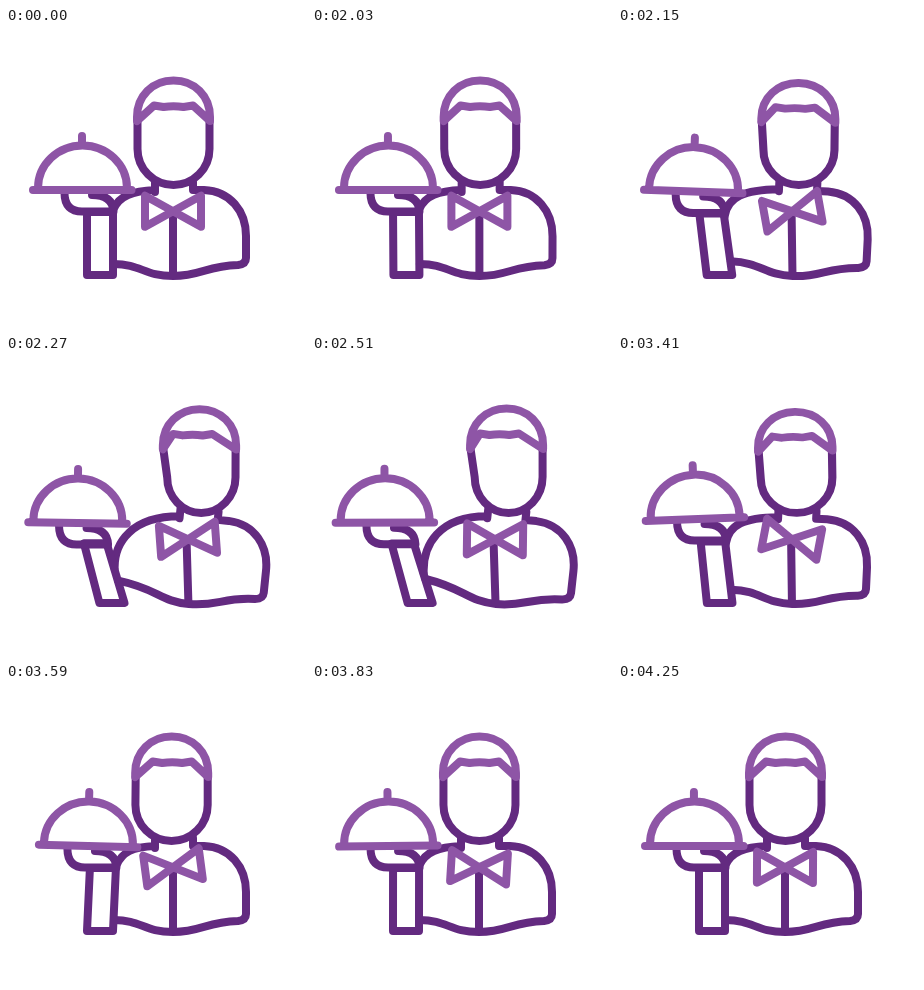
These frames come from a looping animation (300x300 px, 4280 ms). An HTML page:

```html
<!DOCTYPE html>
<html lang="en">
<head>
<meta charset="utf-8">
<style>
  html, body { margin: 0; width: 100%; height: 100%; overflow: hidden; background: #fff; }
  svg { display: block; width: 100vw; height: 100vh; }
  path { fill: none; stroke-width: 8; stroke-linecap: round; stroke-linejoin: round; }
  .dark { stroke: #632a80; }
  .light { stroke: #8e55a6; }
</style>
</head>
<body>
<svg viewBox="0 0 300 300">
  <path id="body" class="dark"/>
  <path id="seam" class="dark"/>
  <g id="head">
    <path id="face" class="dark"/>
    <path id="hair" class="light"/>
  </g>
  <path id="bow" class="light" d="M-28 -15.5V15.5L28 -15.5V15.5Z"/>
  <path id="sleeve" class="dark"/>
  <path id="hand" class="dark" d="M58.5 165C58.5 178 65 183.5 76 183.5H107.5C107 172 99 167 86 167"/>
  <path id="dish" class="light" d="M27 162H125.5M32 160a44.5 42.5 0 0 1 89 0M76 108V116"/>
</svg>
<script>
const LOOP = 4280, STEP = 30, FIRST_STEP = 2030;
const TURN = 2000, RETURN = 3200;

const $ = id => document.getElementById(id);
const shape = (id, d) => $(id).setAttribute('d', d);
const place = (id, transform) => $(id).setAttribute('transform', transform);

function ease(u) {
  u = Math.min(1, Math.max(0, u));
  return u * u * (3 - 2 * u);
}
const bell = (t, center, width) => Math.exp(-(((t - center) / width) ** 2));
const wobble = t => t < 80 ? 0 : 13 * bell(t, 0, 550) * Math.sin((t - 80) / 440 * 2 * Math.PI);

function draw(time) {
  const t = FIRST_STEP + Math.floor((time - FIRST_STEP) / STEP) * STEP;
  const there = t - TURN, back = t - RETURN;

  // The way back mirrors the way out.
  const turn = ease(there / 320) - ease(back / 380);
  const swing = wobble(back) - wobble(there);
  const sway = bell(back, 370, 130) - bell(there, 370, 130);
  const lean = bell(back, 190, 60) - bell(there, 190, 60);
  const headTurn = turn - 0.07 * sway;

  // Dish, hand and sleeve
  const slide = 6 * sway - 1.5 * turn;
  const sink = turn * (3 - 0.5 * slide);
  const handX = slide * (0.5 + 0.7 * turn);
  const top = 184 + 3.5 * turn;
  const topL = 81 + 2.5 * turn + handX, topR = 107 - turn + handX;
  const lowL = 81 + (18 + slide) * turn, lowR = 107 + (17 + slide) * turn;
  place('dish', `translate(${slide} ${sink}) rotate(${-0.2 * swing} 76 162)`);
  place('hand', `translate(${handX} ${sink})`);
  shape('sleeve', `M${topL} ${top}H${topR}L${lowR} 247H${lowL}Z`);

  // Body shears towards the turn; its left ends rest on the sleeve.
  const bend = d => d.replace(/([\d.]+) ([\d.]+)/g, (_, x, y) =>
    `${+x + turn * (17 + (248 - y) * 0.11)} ${+y + turn * (x - 167) * 0.1}`);
  const edge = y => topR + (lowR - topR) * (y - top) / (247 - top) + 0.5;
  const shoulder = 181 + 36 * turn * turn, hem = 236 - 13 * turn * turn;
  shape('body',
    `M${edge(shoulder)} ${shoulder}` +
    `C${edge(shoulder) + 6 - 7 * turn} ${shoulder - 13 - 14 * turn} 126 ${163 - 3 * turn} ` +
    bend('149 162M149 154L149 164M187 154L187 162L198 162' +
      'C224 163 240 183 240 208L240 230Q240 236 232 237' +
      'C200 238 195 248 167 248C138 248 135 236 ') +
    `${edge(hem)} ${hem}`);
  shape('seam', `M${167 + 14.5 * turn} 184L${167 + 16.5 * turn} 247`);
  place('bow', `translate(${167 + 16 * turn} 183.3) rotate(${swing})`);

  // Head: the chin stays level while the crown dips.
  const dip = Math.abs(lean);
  place('head', `translate(${167.5 + 26.5 * headTurn} 157) rotate(${-lean}) ` +
    `scale(${1 + 0.02 * dip} ${1 - 0.037 * dip}) translate(-167.5 -157)`);
  shape('face', `M131.5 93L${131.5 + 4 * headTurn} 121` +
    `A${36 - 2 * headTurn} 36 0 0 0 203.5 121V93`);
  const part = 167.5 - 7 * headTurn;
  shape('hair', 'M131 93V89C131 68 146.5 52.5 167.5 52.5S204 68 204 89V93' +
    `L${part + 19.5} 77.5L${part + 10} 79Q${part} 77.5 ${part - 10} 79L${part - 19.5} 77.5Z`);
}

const begin = performance.now();
function frame() {
  draw((performance.now() - begin) % LOOP);
  requestAnimationFrame(frame);
}
frame();
</script>
</body>
</html>
```
